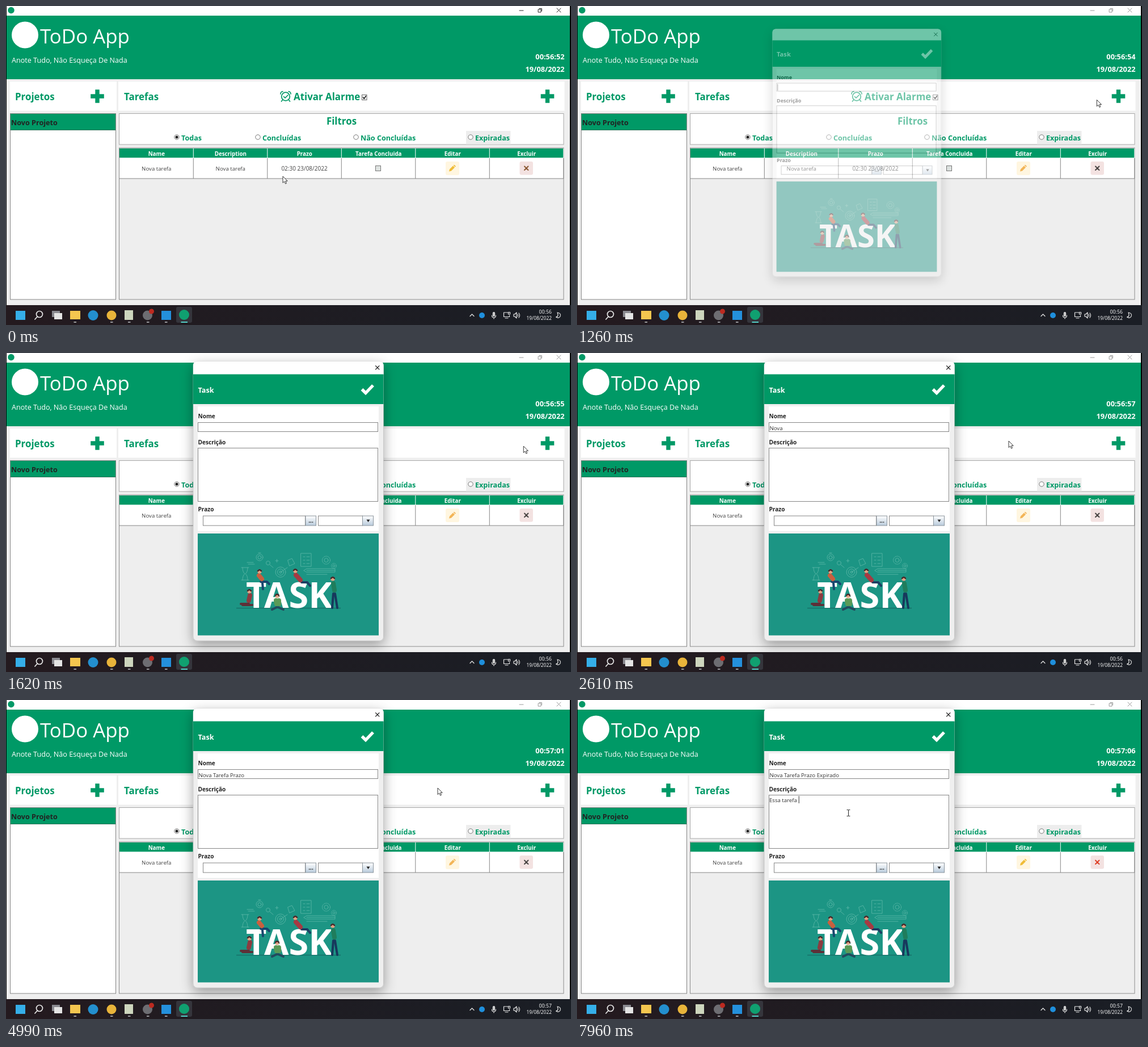
Animation, 996 px wide and 562 px high, one loop 7.99 s. Source, as an HTML page:

```html
<!DOCTYPE html>
<html lang="pt">
<head>
<meta charset="utf-8">
<title>ToDo App</title>
<style>
html, body { margin: 0; width: 100%; height: 100%; overflow: hidden; background: #000; }
svg { display: block; width: 100vw; height: 100vh; }
text { font-family: "Open Sans", "Noto Sans", sans-serif; white-space: pre; }
.b { font-weight: 700; }
.h { font-weight: 700; font-size: 16.9px; fill: #009966; }
.r { font-weight: 700; font-size: 12.6px; fill: #009966; }
.l { font-weight: 700; font-size: 10.1px; fill: #222; }
.i { font-size: 9.6px; fill: #333; }
.m { text-anchor: middle; }
.e { text-anchor: end; }
.g { fill: #009966; }
.w { fill: #fff; }
.box { fill: #fff; stroke: #858585; }
.ln { fill: none; stroke-linecap: round; stroke-linejoin: round; }
</style>
</head>
<body>
<svg viewBox="0 0 996 562" preserveAspectRatio="none">
  <defs>
    <path id="plus" d="M-11.8 0H11.8M0 -11.8V11.8" stroke="#009966" stroke-width="7.400"/>
    <linearGradient id="steel" x2="0" y2="1"><stop stop-color="#fff"/><stop offset="1" stop-color="#b9cbdc"/></linearGradient>
    <linearGradient id="bar"><stop stop-color="#241a1f"/><stop offset="1" stop-color="#1a1e25"/></linearGradient>
    <filter id="shade" x="-20%" y="-20%" width="140%" height="140%">
      <feDropShadow dx="0" dy="7" stdDeviation="11" flood-opacity=".36"/>
    </filter>
  </defs>

  <!-- window -->
  <rect x="1" width="993" height="528" fill="#efefef"/>
  <rect x="1" width="993" height="17" class="w"/>
  <circle cx="9" cy="7.5" r="5.7" class="g"/>
  <path id="winButtons" class="ln" d="M905 8H912M938.500 6H943V11H938.500ZM940 4.500H944.500V9M971 4L978 11M978 4L971 11"/>
  <rect x="1" y="17" width="993" height="112" class="g"/>
  <circle cx="33.500" cy="51" r="23.500" class="w"/>
  <text x="60" y="66" font-size="34.800" class="w">ToDo App</text>
  <text x="10" y="100" font-size="12.600" class="w">Anote Tudo, Não Esqueça De Nada</text>
  <text id="clock" x="984.500" y="93.500" font-size="12.800" class="b w e"></text>
  <text x="984.500" y="116" font-size="12.800" class="b w e">19/08/2022</text>

  <!-- panels -->
  <rect x="7" y="133" width="188" height="51.500" class="w"/>
  <rect x="198" y="133" width="786.500" height="51.500" class="w"/>
  <text x="16" y="166" class="h">Projetos</text>
  <text x="208" y="166" class="h">Tarefas</text>
  <text x="507" y="166" class="h">Ativar Alarme</text>
  <use href="#plus" x="161" y="159"/>
  <use href="#plus" x="954.500" y="159"/>
  <g class="ln" stroke="#009966" stroke-width="1.700">
    <circle cx="493" cy="159.500" r="7.300"/>
    <path d="M489.500 159.500L492 162L497 157M484 155Q484 151 488 150.500M498 150.500Q502 151 502 155M487.500 165.500L485.500 168M498.500 165.500L500.500 168"/>
  </g>
  <rect x="627.500" y="156.500" width="8.500" height="9" fill="#fff" stroke="#666"/>
  <path d="M629.500 160.500L631 163.500L634.500 158.500" class="ln" stroke="#111" stroke-width="1.500"/>

  <rect x="7.500" y="189.500" width="186" height="327.500" class="box"/>
  <rect x="8" y="190" width="185" height="29" class="g"/>
  <path d="M8 218.500H193" stroke="#28745a"/>
  <text x="9" y="210" font-size="12.600" class="b" fill="#222">Novo Projeto</text>

  <rect x="199.500" y="189.500" width="783.500" height="54.500" class="box" style="stroke:#a8a8a8"/>
  <text x="591.500" y="209" class="h m">Filtros</text>
  <rect x="811" y="220" width="78.500" height="23.500" fill="#ededed"/>
  <g id="radios"></g>
  <circle cx="301" cy="231" r="2.500" fill="#222"/>

  <rect x="199.500" y="250" width="783.500" height="267" fill="#eee" stroke="#8c8c8c"/>
  <rect x="200" y="251" width="783" height="16.500" class="g"/>
  <rect x="200" y="267.500" width="782.500" height="36.500" class="w"/>
  <g id="table"></g>
  <path d="M200 304H983" stroke="#858585"/>
  <text x="526" y="290" font-size="10" class="m" fill="#444">02:30 23/08/2022</text>
  <rect x="651.500" y="281.500" width="9" height="9" fill="#dfe4e2" stroke="#777"/>
  <rect x="775" y="274" width="24" height="24" rx="3" fill="#fff6e0"/>
  <path id="pencil" d="M781 291.500L782 287.500L788 281.500L791 284.500L785 290.500ZM788.800 280.700L790 279.700L793 282.300L791.700 283.700Z"/>
  <rect x="905.500" y="274" width="23.500" height="23.500" rx="3" fill="#f3e2e1"/>
  <path id="cross" class="ln" d="M914 282.500L920.500 289M920.500 282.500L914 289" stroke-width="2"/>

  <!-- taskbar -->
  <rect y="527" width="996" height="35" fill="url(#bar)"/>
  <rect x="300" y="530" width="28" height="28" rx="3" fill="#35353c"/>
  <rect x="17" y="537" width="17" height="16" fill="#35aee8"/>
  <g class="ln" stroke="#e8e8e8" stroke-width="1.700">
    <circle cx="59" cy="543" r="5.500"/><path d="M55 547.500L51 552"/>
  </g>
  <rect x="81" y="537" width="14" height="11" fill="#8a8a90"/>
  <rect x="85" y="541" width="14" height="11" fill="#e4e4e4"/>
  <rect x="113" y="537" width="18" height="15" fill="#f4c64f"/>
  <circle cx="153.500" cy="545" r="9" fill="#238fce"/>
  <circle cx="186" cy="545" r="8.500" fill="#e9b43a"/>
  <rect x="209" y="536" width="15" height="17" fill="#cdd5bd"/>
  <circle cx="249.500" cy="545" r="8.500" fill="#6d6d72"/>
  <circle cx="256.500" cy="538" r="4.500" fill="#bd2a20"/>
  <rect x="274" y="537" width="17" height="16" fill="#2490dc"/>
  <circle cx="314" cy="544" r="9" fill="#10a070"/>
  <path d="M119.500 557H124M184 557H188.500M215 557H219.500M248 557H252.500M280 557H284.500" stroke="#9a9a9e" stroke-width="1.800"/>
  <path d="M308.500 557H320" stroke="#55cfc8" stroke-width="2"/>
  <circle cx="839" cy="545" r="5" fill="#1f8fdc"/>
  <g class="ln" stroke="#e6e6e6" stroke-width="1.200">
    <path d="M818 546.500L821.500 543L825 546.500M856.500 545Q856.500 549 860 549T863.500 545M860 549V551"/>
    <rect x="858.500" y="539.500" width="3" height="7" rx="1.500" fill="#bbb"/>
    <path d="M885 540H877.500V547.500H887.500V545M880 550H885M885.500 539.500H888.500V543H885.500Z"/>
    <path d="M895 543H897L900 540V550L897 547H895ZM902 543Q903.500 545 902 547M904 541Q907 545 904 549"/>
    <path d="M972 540Q979 541 977 547Q974 551 969.500 548Q975 547 972 540Z"/>
  </g>
  <text id="trayTime" x="962" y="541.500" font-size="8.800" class="w e"></text>
  <text x="962" y="553" font-size="8.400" class="w e">19/08/2022</text>

  <!-- dialog -->
  <g id="dialog">
    <rect x="330" y="15" width="335.500" height="492" rx="7" fill="#efefef" stroke="#b5b5b5" stroke-width=".6" filter="url(#shade)"/>
    <path d="M330 38V22Q330 15 337 15H658.500Q665.500 15 665.500 22V38Z" class="w"/>
    <path d="M651.500 22.500L658 29M658 22.500L651.500 29" class="ln" stroke="#222" stroke-width="1.100"/>
    <rect x="330" y="37.500" width="335.500" height="52.500" class="g"/>
    <text x="338.500" y="69.500" font-size="12.600" class="b w">Task</text>
    <path d="M627.500 64L634 70.500L647 57" fill="none" stroke="#fff" stroke-width="5.400"/>
    <rect x="338" y="94" width="319" height="219.500" class="w"/>
    <text x="338.500" y="115" class="l">Nome</text>
    <text x="338.500" y="160.500" class="l">Descrição</text>
    <text x="338.500" y="279" class="l">Prazo</text>
    <rect x="338.500" y="122.500" width="317" height="16" class="box"/>
    <rect x="338.500" y="167.500" width="317" height="94" class="box"/>
    <text id="name" x="339.500" y="135.500" class="i"></text>
    <text id="desc" x="339" y="180" class="i"></text>
    <rect id="caret" width="1" height="13" fill="#333"/>
    <rect x="347.500" y="287" width="180" height="17" class="box"/>
    <rect x="528" y="287" width="18.500" height="17" fill="url(#steel)" stroke="#8a949c"/>
    <text x="537.500" y="299" class="l m">...</text>
    <rect x="550.500" y="287" width="78" height="17" class="box"/>
    <rect x="628.500" y="287" width="19" height="17" fill="url(#steel)" stroke="#8a949c"/>
    <path d="M635.500 293.500H641.500L638.500 298Z" fill="#222"/>

    <rect x="338" y="318" width="319" height="179.500" fill="#1c9584"/>
    <g class="ln" stroke="#58b5a5" stroke-width=".9">
      <circle cx="447" cy="360" r="6"/><circle cx="447" cy="360" r="3"/><path d="M445 352H449"/>
      <circle cx="462" cy="370" r="3.500"/><path d="M465 373L471 378M425 369H436M427 372H438M475 366H480M477.500 363.500V368.500"/>
      <path d="M497 365L504 362L509 371L500 375ZM520 353H538V376H520ZM524 359H527M530 359H535M524 365H527M530 365H535M524 371H527M530 371H535"/>
      <circle cx="564.500" cy="365" r="7" stroke-dasharray="2 1.200"/><circle cx="564.500" cy="365" r="3.500"/>
      <circle cx="578" cy="375" r="4.500" stroke-dasharray="2 1.200"/><circle cx="578" cy="375" r="2"/>
      <circle cx="484" cy="386" r="9"/><circle cx="484" cy="386" r="5.500"/><circle cx="484" cy="386" r="2"/><path d="M484 386L496 378"/>
      <path d="M525 383L530 380H580V386H530ZM530 383H580M530 390H566"/>
      <path d="M415 378H428M415 400H428M417 378Q417 386 421 389Q417 392 417 400M426 378Q426 386 422 389Q426 392 426 400"/>
    </g>
    <path d="M406 449.500H590" stroke="#176f68" stroke-width="1.500"/>
    <text x="499" y="449" font-size="63" font-weight="700" class="w m">TASK</text>
    <g id="people" class="ln"></g>
  </g>

  <path id="arrow" d="M0 0V11.500L2.700 9L4.600 13.200L6.500 12.300L4.700 8.300H8.200Z" fill="#fff" stroke="#222" stroke-width=".9"/>
  <path id="beam" class="ln" d="M-2.500 -5.500H-.7L0 -5L.7 -5.500H2.500M0 -5V5M-2.500 5.500H-.7L0 5L.7 5.500H2.500" stroke="#222"/>
</svg>
<script>
const LOOP = 7990, OPEN = 1230;
const $ = id => document.getElementById(id);
const add = (id, html) => $(id).insertAdjacentHTML("beforeend", html);

[[301, "Todas"], [444, "Concluídas"], [617, "Não Concluídas"], [819, "Expiradas"]].forEach(([x, label]) =>
  add("radios", `<circle cx="${x}" cy="231" r="4.2" fill="#fff" stroke="#777"/>
    <text x="${x + 8}" y="237" class="r">${label}</text>`));

["Name", "Description", "Prazo", "Tarefa Concluida", "Editar", "Excluir"].forEach((title, i) => {
  const x = 200 + i * 130.5, mid = x + 65.3;
  add("table", `<text x="${mid}" y="263.5" font-size="9.8" class="b w m">${title}</text>
    <path d="M${x + 130.3} 251V268" stroke="#fff"/><path d="M${x + 130.3} 268V304" stroke="#858585"/>`);
  if (i < 2) add("table", `<text x="${mid}" y="290" font-size="9.7" class="m" fill="#444">Nova tarefa</text>`);
});

// Each figure: head position, torso line, leg line and their colours
[
  [447, 385, "M446 392L451 398", "M449 403L460 403L464 407M452 405L453 416", "#c9603f", "#17466e"],
  [510, 384, "M511 391L519 400", "M521 404L531 404L536 410", "#a53a42", "#1d3f63"],
  [429, 420, "M430 427L428 436", "M428 442L414 442M417 444L434 444", "#8c3b40", "#5d3038"],
  [478, 428, "M476 436L477 442M481 436V442", "M477 448L469 452M480 448L489 452", "#5a9a57", "#234a5e"],
  [576, 398, "M577 406L579 418", "M577 424L575 449M580 424L584 449", "#1f7d5c", "#17385c"]
].forEach(([x, y, torso, legs, top, bottom]) => add("people",
  `<path d="${legs}" stroke="${bottom}" stroke-width="4"/><path d="${torso}" stroke="${top}" stroke-width="8"/>
   <circle cx="${x}" cy="${y}" r="3.6" fill="#e2a283"/><path d="M${x - 3} ${y - 1}Q${x} ${y - 5} ${x + 3} ${y - 1}" stroke="#43282b" stroke-width="2.5"/>`));

// Piecewise interpolation over [time, value] points
function track(points, t, ease = p => p) {
  if (t <= points[0][0]) return points[0][1];
  for (let i = 1; i < points.length; i++) {
    const [t0, a] = points[i - 1], [t1, b] = points[i];
    if (t < t1) return a + (b - a) * ease((t - t0) / (t1 - t0));
  }
  return points[points.length - 1][1];
}
const smooth = p => p * p * (3 - 2 * p);
const show = (id, on) => $(id).setAttribute("display", on ? "inline" : "none");

const mouseX = [[0, 488], [960, 921], [1320, 916], [1680, 912], [2420, 761], [5800, 761], [6010, 530], [6380, 478.5]];
const mouseY = [[0, 300], [960, 169], [1320, 165], [1680, 164], [2420, 155], [5800, 155], [6010, 219], [6380, 199]];
const nameKeys = [[2270, 0], [2600, 4], [2760, 4], [2920, 5], [4040, 13], [5340, 21], [5600, 26]];
const descKeys = [[6550, 0], [6580, 1], [6910, 4], [7180, 4], [7210, 5], [7930, 12]];

function draw(t) {
  const sec = Math.floor(52.9 + t * 0.00166);
  $("clock").textContent = `00:${56 + Math.floor(sec / 60)}:${String(sec % 60).padStart(2, "0")}`;
  $("trayTime").textContent = t < 3640 ? "00:56" : "00:57";

  const open = Math.min(1, Math.max(0, (t - OPEN) / 180));
  const scale = 1 - 0.2 * (1 - open) ** 3;
  $("dialog").setAttribute("transform", `translate(458 240) scale(${scale}) translate(-458 -240)`);
  $("dialog").setAttribute("opacity", Math.min(1, open * 2.5));
  $("winButtons").setAttribute("stroke", open ? "#999" : "#222");
  $("pencil").setAttribute("fill", t > 800 && t < 5900 ? "#f3b557" : "#f0bd38");
  $("cross").setAttribute("stroke", t < 800 ? "#8b5a34" : t < 5900 ? "#4a4644" : "#df4229");

  $("name").textContent = "Nova Tarefa Prazo Expirado".slice(0, track(nameKeys, t));
  $("desc").textContent = "Essa tarefa ".slice(0, track(descKeys, t));
  const inDesc = t > 6400, field = $(inDesc ? "desc" : "name");
  $("caret").setAttribute("x", field.x.baseVal[0].value + field.getComputedTextLength() + 0.5);
  $("caret").setAttribute("y", inDesc ? 169 : 124.5);
  show("caret", (inDesc || t < 5620) && (t + 150) % 600 < 320);

  const x = track(mouseX, t, smooth), y = track(mouseY, t, smooth);
  const overText = t > 5800 && x < 656 && y > 167;
  const pointer = overText ? "beam" : "arrow";
  show("arrow", !overText);
  show("beam", overText);
  $(pointer).setAttribute("transform", `translate(${x} ${y})`);
}

const start = performance.now();
function tick() {
  draw((performance.now() - start) % LOOP);
  requestAnimationFrame(tick);
}
tick();
</script>
</body>
</html>
```
